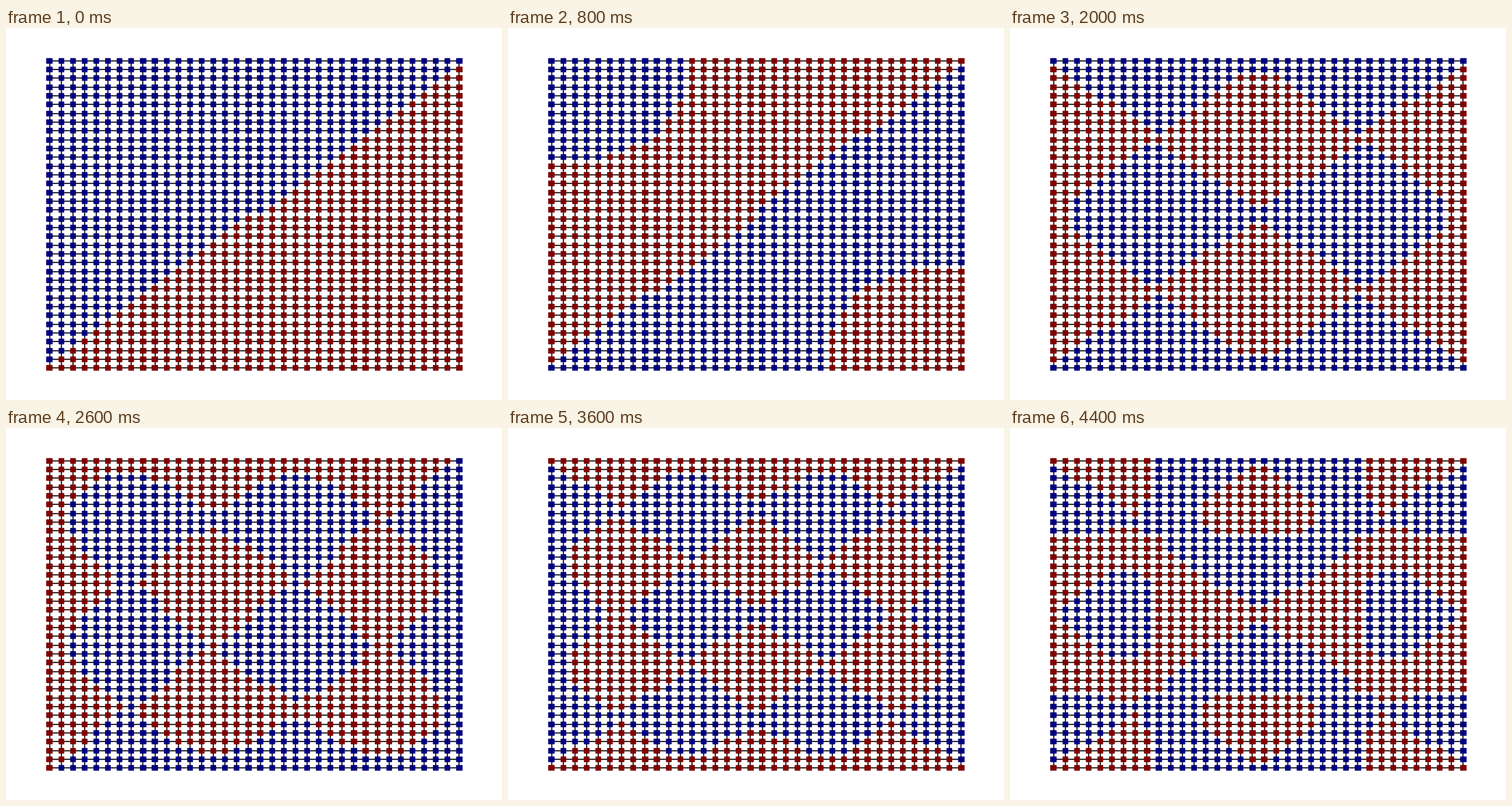
These frames come from a looping animation (640 px wide and 480 px high, 4.6 s). A matplotlib script:

```python
import numpy as np
import matplotlib.pyplot as plt
from matplotlib.animation import FuncAnimation
from matplotlib.collections import LineCollection

N = 36
BLUE, RED = "#000080", "#800000"

# Wave counts of the mode families, in order of rising eigenvalue
FAMILIES = [(1, 0), (2, 0), (2, 1), (3, 1), (3, 2), (4, 0), (3, 3),
            (5, 0), (5, 1), (4, 4), (6, 0), (6, 1), (6, 2)]
FRAMES = 23

row, col = (a.ravel() for a in np.mgrid[0:N, 0:N])


def grid_modes():
    """Normalised Laplacian modes, odd and even across the anti-diagonal."""
    path = np.eye(N, k=1) + np.eye(N, k=-1)
    adj = np.kron(path, np.eye(N)) + np.kron(np.eye(N), path)
    scale = 1 / np.sqrt(adj.sum(axis=0))
    lap = np.eye(N * N) - scale[:, None] * adj * scale
    mirror = (N - 1 - col) * N + (N - 1 - row)
    lap[np.arange(N * N), mirror] += 10  # moves the even modes to the end
    vecs = np.linalg.eigh(lap)[1]
    n_odd = N * (N - 1) // 2
    return vecs[:, :60], vecs[:, n_odd:n_odd + 60]


def pick(vecs, m, n, swap):
    """The mode closest to cos(mx)cos(ny) + swap * cos(nx)cos(my)."""
    x, y = (col + 0.5) * np.pi / N, (row + 0.5) * np.pi / N
    guess = np.cos(m * x) * np.cos(n * y) + swap * np.cos(n * x) * np.cos(m * y)
    fit = guess @ vecs
    best = np.argmax(np.abs(fit))
    return np.sign(fit[best]) * vecs[:, best]


def family(m, n):
    """Both modes of a family; a trace of each settles the other's zeros."""
    parity = (-1) ** (m + n)
    even = pick(even_vecs, m, n, parity)
    if m == n:
        return [even]
    odd = pick(odd_vecs, m, n, -parity)
    s = 1 if n == 0 and 1 < m < 6 else -1
    t = -1 if m in (3, 4) else 1
    trace = 1e-6
    return [s * odd + trace * t * even, t * even - trace * s * odd]


odd_vecs, even_vecs = grid_modes()
waves = [w for pair in FAMILIES for w in family(*pair)][:FRAMES]

fig = plt.figure(figsize=(6.4, 4.8), dpi=100, facecolor="white")
ax = fig.add_axes([0, 0, 1, 1])
ax.axis("off")
mid = (N - 1) / 2
half = mid * 1.21
ax.set_xlim(mid - half, mid + half)
ax.set_ylim(mid + half, mid - half)

lines = [[(0, k), (N - 1, k)] for k in range(N)]
lines += [[(k, 0), (k, N - 1)] for k in range(N)]
ax.add_collection(LineCollection(lines, colors="black", linewidths=1, zorder=1))
nodes = ax.scatter(col, row, s=20, marker="s", c=BLUE, linewidths=1, zorder=2)


def update(k):
    nodes.set_color(np.where(waves[k] > 0, RED, BLUE))
    return [nodes]


anim = FuncAnimation(fig, update, frames=FRAMES, interval=200,
                     repeat=True, repeat_delay=0)
plt.show()
```
